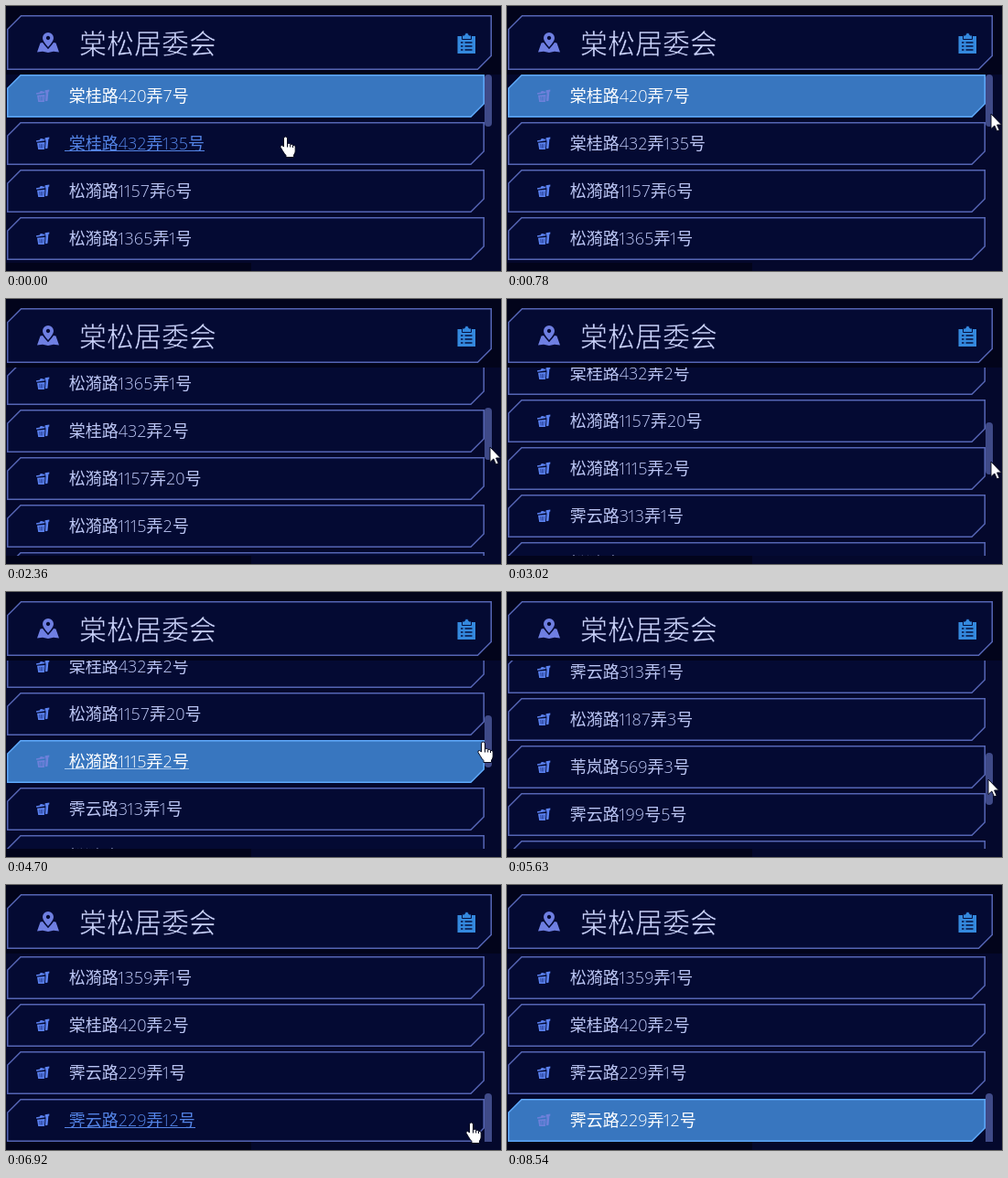
Write an HTML page that moves like this. It is 541 px wide and 290 px high and loops after 8940 ms.

```html
<!DOCTYPE html>
<html lang="zh-CN">
<head>
<meta charset="utf-8">
<title>居委会地址列表</title>
<style>
html, body { margin: 0; width: 100%; height: 100%; overflow: hidden; background: #02041d; }
svg { display: block; width: 541px; height: 290px; }
text { font-family: "Open Sans", "Noto Sans CJK SC", "Noto Sans CJK", sans-serif; font-weight: 300; white-space: pre; }
.title { font-size: 30px; fill: #cbd3fb; stroke: #040a33; stroke-width: .6; }
.panel { fill: #040a33; stroke: #5565b4; stroke-width: 1.5; }
.row text { font-size: 18px; fill: #bcc6f4; }
.row .icon { fill: #5b82f0; }
.row .slit { fill: none; stroke: #1c2f7c; stroke-width: .7; }
.row .line { fill: none; }
.row.hover text, .row.hover .line { fill: #5484e6; }
.row.selected .panel { fill: #3876bf; stroke: #5fa9fb; }
.row.selected text { fill: #fff; }
.row.selected .icon { fill: #6d80da; }
.row.selected .slit { stroke: #3876bf; }
.row.selected.hover .line { fill: #a9c9ee; }
</style>
</head>
<body>
<svg viewBox="0 0 541 290">
  <defs>
    <clipPath id="view"><path d="M0 75H541V281H0Z"/></clipPath>
  </defs>
  <path fill="#02041b" d="M0 0H541V290H0Z"/>
  <path fill="#04082c" d="M0 75H541V290H268V281H0Z"/>
  <path class="panel" d="M16.5 10.75H530.25V54.5L515.5 69.25H1.75V25.5Z"/>
  <g fill="#6f7fe2">
    <path fill-rule="evenodd" d="M46 29a6 6 0 0 1 6 6q0 3.500-6 10-6-6.500-6-10a6 6 0 0 1 6-6zm0 3.800a2.200 2.200 0 1 0 .01 0z"/>
    <path d="M37.500 40.500l2.500-.5q2 3 6 7.200 4-4.200 6-7.200l2.500 .5 3.500 10-6-.8-6 1.300-6-1.300-6 .8z"/>
  </g>
  <text class="title" x="80" y="52">棠松居委会</text>
  <g fill="#3489de" stroke="#06103f">
    <path stroke="none" d="M493.500 33H513V52H493.500Z"/>
    <path d="M498.500 32H501a2.500 2.500 0 0 1 5 0H508.500V36.500H498.500Z"/>
    <path stroke-width="1.500" d="M497 40h2.500m2 0h8M497 44h2.500m2 0h8M497 48h2.500m2 0h8"/>
  </g>
  <g clip-path="url(#view)">
    <g id="list"></g>
    <rect id="thumb" x="523" width="8" height="57" rx="4" fill="#3f4a88"/>
  </g>
  <g id="hand" fill="#fff" stroke="#05081c">
    <path d="M4.500 3a2 2 0 0 1 4 0v6l1-.6q1.800-.5 2.300 1 2.200-.8 2.600 1 2.600-.6 2.800 1.600v5q0 2-1.600 4v2.500h-8.600v-2q-2-2-3.600-5l-2.400-4q-.6-2.200 1.600-2 1 .2 1.900 1.600z"/>
    <path fill="none" d="M8.500 9v3.500M11.700 9.500v3M14.500 10.500v2.500"/>
  </g>
  <path id="arrow" fill="#fff" stroke="#05081c" d="M0 0V16.500L3.800 13 6.500 19 9.200 17.800 6.600 12H11.500Z"/>
</svg>
<script>
const LOOP = 8940, STEP = 130, PITCH = 52, TOP = 75, BOTTOM = 281, EDGE = 523;
const THUMB_RATIO = 3.72;
const $ = id => document.getElementById(id);

const streets = { t: '棠桂路', s: '松漪路', j: '霁云路', w: '苇岚路' };
const labels = ('t420弄7 t432弄135 s1157弄6 s1365弄1 t432弄2 s1157弄20 s1115弄2 j313弄1 ' +
  's1187弄3 w569弄3 j199号5 s1359弄1 t420弄2 j229弄1 j229弄12')
  .split(' ').map(s => '\u00a0' + streets[s[0]] + s.slice(1) + '号');

// Thumb drags and free pointer moves, in order of time.
const moves = [
  { from: 150, to: 780, x: 529, y: 118 },
  { from: 1280, to: 1550, scroll: 44 },
  { from: 1700, to: 2360, scroll: 162 },
  { from: 2480, to: 3020, scroll: 225 },
  { from: 3420, to: 3540, x: 500, y: 201 },
  { from: 4190, to: 4700, x: 521, y: 164 },
  { from: 4850, to: 4970, x: 526, y: 165 },
  { from: 5090, to: 6140, scroll: 495 },
  { from: 6290, to: 6800, scroll: 569 },
  { from: 6920, to: 7070, x: 489, y: 263 },
  { from: 7220, to: 7220, x: 440, y: 266 },
  { from: 8150, to: 8540, x: 475, y: 296 }
];

// Share of a move done at time t; it advances in steps of about STEP ms.
function progress({ from, to }, t) {
  const gaps = Math.round((to - from) / STEP);
  const done = Math.floor((t - from + 15) / (to - from || 1) * gaps);
  return Math.min(1, (done + 1) / (gaps + 1));
}

function stateAt(t) {
  const s = { x: 305, y: 143, scroll: 0 };
  for (const m of moves.filter(m => m.from <= t)) {
    const u = progress(m, t);
    if (m.scroll) {
      const d = (m.scroll - s.scroll) * u;
      s.scroll += d;
      s.y += d / THUMB_RATIO;
    } else {
      s.x += (m.x - s.x) * u;
      s.y += (m.y - s.y) * u;
    }
  }
  return s;
}

// Tightens the space on both sides of the digit 1.
const kern = s => [...s].map((c, i) => -1.7 * ((c === '1') + (s[i - 1] === '1'))).join(' ');

const list = $('list');
list.innerHTML = labels.map(s => `<g class="row">
  <path class="panel" d="M16 .75H522.25V32L508 46.250H1.750V15Z"/>
  <path class="icon" d="M33 20.200l4-.8 .3-1.200 2.500-.3 .5 .8 2-.3 .2 1.800-9.300 1.600zM34 22.800l8.500-.8-.6 8h-6.700zM42.500 17.300l4.800-.8v2l-.9 .3-.9 10-2.600 .4 .6-8.200z"/>
  <path class="slit" d="M36.700 24l.3 4.500M38.500 24v4.500M40.300 24l-.3 4.500"/>
  <rect class="line" x="64" y="31" height="1"/>
  <text x="64" y="30" dx="${kern(s)}">${s}</text></g>`).join('');

const rows = [...list.children];
for (const row of rows) {
  const box = row.querySelector('text').getBBox();
  row.querySelector('.line').setAttribute('width', Math.round(box.x + box.width - 64));
}

function place(el, x, y) {
  el.setAttribute('transform', `translate(${Math.round(x)} ${Math.round(y)})`);
}

function draw(t) {
  const { x, y, scroll } = stateAt(t);
  const selected = t < 3940 ? 0 : t < 7620 ? 6 : 14;
  let over = false;

  rows.forEach((row, i) => {
    const top = TOP + i * PITCH - Math.round(scroll);
    const hover = x < EDGE && y >= top && y < top + 47 && y < BOTTOM;
    over = over || hover;
    place(row, 0, top);
    row.classList.toggle('selected', i === selected);
    row.classList.toggle('hover', hover);
  });

  $('thumb').setAttribute('y', Math.round(TOP + scroll / THUMB_RATIO));
  $('hand').style.display = over ? '' : 'none';
  $('arrow').style.display = over ? 'none' : '';
  place($('hand'), x - 6, y - 1);
  place($('arrow'), x, y);
}

const start = performance.now();
function loop() {
  draw((performance.now() - start) % LOOP);
  requestAnimationFrame(loop);
}
loop();
</script>
</body>
</html>
```
